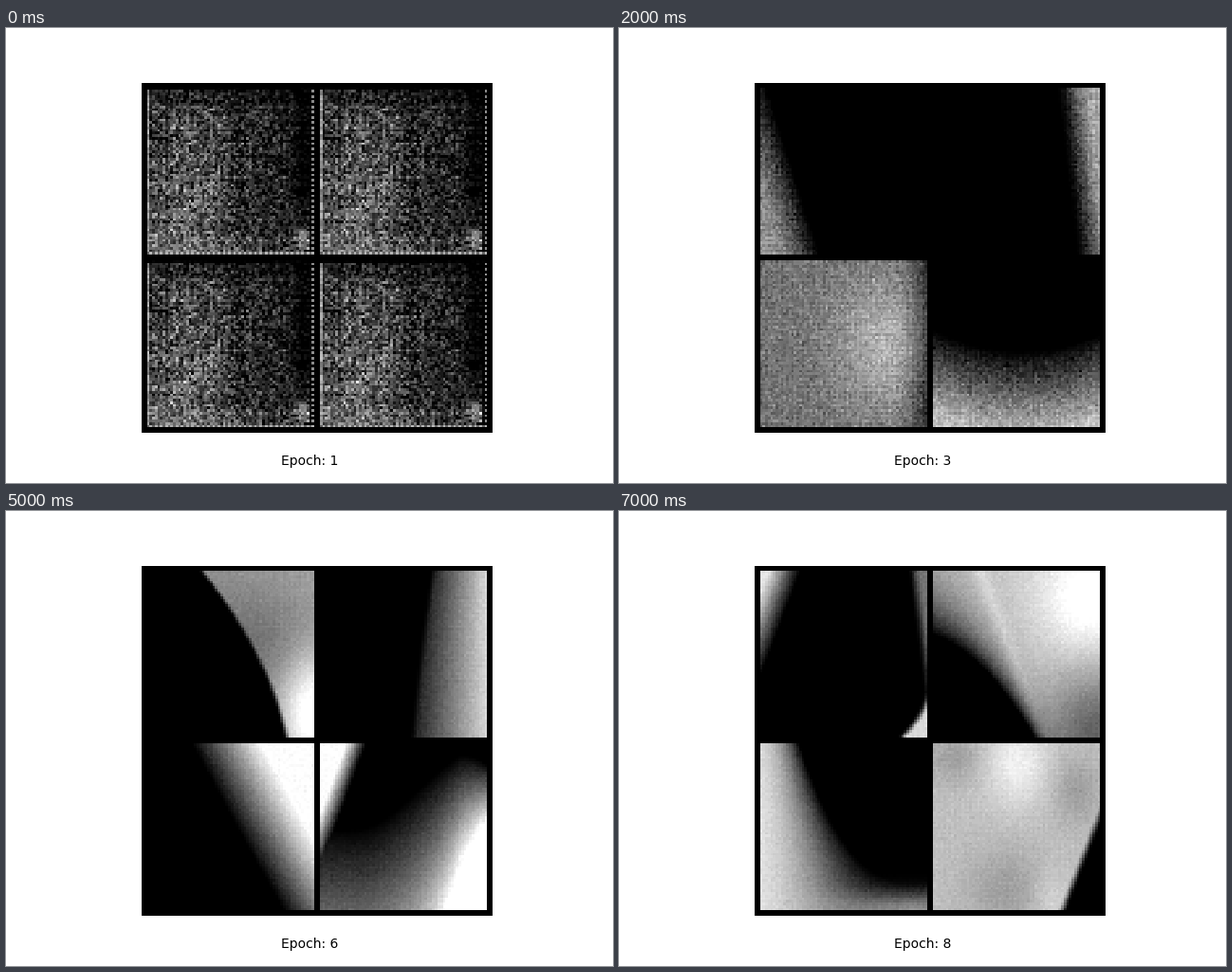
Animation of 640x480 px, one loop 8000 ms. Source, as a matplotlib script:

```python
import numpy as np
import matplotlib.pyplot as plt
from matplotlib.animation import FuncAnimation

N, PAD = 64, 2
V, U = np.mgrid[0:N, 0:N]
X, Y = U / (N - 1), V / (N - 1)


def ramp(d, w):
    return np.clip(d / w, 0, 1)


def soft(d, w):
    t = ramp(d, w)
    return t * t * (3 - 2 * t)


def rise(d, k):
    """Brightness that saturates with the depth d inside an edge."""
    return 1 - np.exp(-k * np.maximum(d, 0))


def bow(t, start, mid, end):
    """Parabola through its values at t = 0, 0.5 and 1."""
    return (start * (1 - t) * (1 - 2 * t) + 4 * mid * t * (1 - t)
            + end * t * (2 * t - 1))


def blob(cx, cy, sx, sy):
    return np.exp(-((X - cx) / sx) ** 2 - ((Y - cy) / sy) ** 2)


def ridge(center, width):
    return np.exp(-((X - center) / width) ** 2)


def grain(tile, rng, amount):
    weave = (U % 2 + V % 2 - 1) * 0.6
    noise = rng.normal(0, 1, tile.shape) + weave
    return tile + amount * noise * ramp(tile, 0.15)


def static(rng):
    mean = 0.13 + 0.23 * blob(0.27, 0.45, 0.27, 0.5)
    mean += 0.16 * blob(0.05, 1, 0.4, 0.35) + 0.08 * soft(Y - 0.85, 0.1)
    mean *= 1 - 0.9 * soft(X - 0.8, 0.15) * (1 - soft(Y - 0.55, 0.4))
    mean *= 0.5 + 0.5 * ramp(Y, 0.15)
    stripes = rng.normal(0, 0.04, (N, 1)) + rng.normal(0, 0.04, (1, N))
    noise = rng.normal(0, 0.16, (N, N)) + stripes
    base = mean + noise * (0.3 + 0.7 * ramp(mean, 0.2))
    base += 0.45 * blob(0.94, 0.91, 0.04, 0.06)
    base[:, 0] = rng.uniform(0.45, 0.75, N)
    base[:, -2] *= 0.2
    base[:, -1] = 0.55 * (np.arange(N) % 2)
    base[-1] = 0.4 + 0.3 * (np.arange(N) % 2)
    base[0] = 0
    return [base + rng.normal(0, 0.015, (N, N)) for _ in range(4)]


def sparks(rng):
    lattice = (V % 4 == 0) & (U % 4 == U // 36)

    def dots(chance, level):
        area = lattice & (U > 18) & (V > 3) & (V < 47)
        lit = area & (rng.random((N, N)) < chance)
        t = lit * level * rng.random((N, N))
        t[59, 8:52:4] = level * rng.uniform(0.2, 1, 11)
        t[12:48:4, 61] = level * rng.uniform(0.2, 1, 9)
        return t

    top, faint = dots(0.4, 0.5), dots(0.06, 0.2)
    glow = blob(0.51, 0.42, 0.12, 0.32) + 0.75 * blob(0.75, 0.47, 0.13, 0.28)
    glow += 0.2 * blob(0.5, 0.45, 0.38, 0.45)
    glow *= 1 - 0.5 * blob(0.635, 0.45, 0.025, 0.35)
    keep = rng.random((N, N)) < 1.5 * glow
    cloud = keep * ramp(glow, 1) ** 0.7 * rng.uniform(0.25, 0.85, (N, N))
    frame = lattice & (U > 7) & (V > 3) & (V < 60)
    cloud = np.maximum(cloud, frame * 0.6 * rng.random((N, N)) ** 2)
    cloud[59, 8:52:2] = rng.uniform(0.2, 0.85, 22)
    return [top, faint, np.maximum(cloud, top), faint * 0.6]


def epoch3():
    return [
        0.55 * ramp(0.03 + 0.32 * Y - X, 0.22),
        0.65 * soft(X - 0.74 - 0.12 * Y, 0.22),
        0.45 + 0.25 * blob(0.75, 0.5, 0.3, 0.4) - 0.4 * soft(X - 0.8, 0.3),
        0.75 * ramp(Y - bow(X, 0.42, 0.55, 0.45), 0.5),
    ]


def epoch4():
    strip = 0.95 * ramp(X - bow(Y, 0.72, 0.77, 0.9), 0.2)
    strip *= 1 - 0.85 * ramp(Y - 0.7, 0.28)
    floor = 0.27 * ramp(Y - 0.73, 0.27) * (1 - 0.7 * ramp(X - 0.66, 0.19))

    folds = 0.66 + 0.08 * blob(0.1, 0.4, 0.2, 0.3)
    folds -= 0.14 * ridge(0.45 - 0.08 * Y, 0.14)
    folds += (0.05 + 0.3 * Y) * ridge(0.58 + 0.28 * Y, 0.14)
    folds -= 0.5 * soft(X - 0.72, 0.3) * (1 - Y) ** 2
    folds *= soft(bow(Y, 1.03, 1, 0.87) - X, 0.07)
    gap = soft(X - 0.62, 0.05) * soft(0.13 + 0.67 * Y - X, 0.07)

    shore = bow(X, 0.26, 0.54, 0.38)
    return [
        (0.62 + 0.15 * Y) * ramp(bow(Y, -0.23, 0.2, 0.34) - X, 0.2),
        np.maximum(strip, floor),
        folds * (1 - gap),
        (1.05 - 0.28 * X) * ramp((Y - shore) / (1 - shore), 0.9),
    ]


def epoch5():
    return [
        0.8 * ramp(X - bow(Y, 0.35, 0.55, 0.7), 0.4),
        0.85 * ramp(X - 0.66 + 0.1 * Y, 0.36),
        0.9 * ramp(X - bow(Y, 0.22, 0.45, 0.72), 0.45),
        0.9 * rise(Y - bow(X, 0.25, 0.5, 0.3), 2.4),
    ]


def epoch6():
    slope = 0.52 + 0.12 * X * (1 - Y) - 0.12 * blob(0.65, 0.4, 0.4, 0.3)
    slope += 0.55 * blob(1, 0.88, 0.2, 0.38)
    slope *= soft(X - bow(Y, 0.31, 0.64, 0.82), 0.04)

    edge = bow(Y, 0.66, 0.59, 0.54)
    column = (0.08 + 0.76 * (X - edge) / (1 - edge)) * soft(X - edge, 0.05)

    hill = 0.52 - 0.5 * soft(X - 0.2, 0.8) + 0.1 * ramp(X - 0.85, 0.15)
    return [
        slope,
        column,
        ramp(X - bow(Y, 0.27, 0.54, 0.82), 0.42),
        np.maximum((0.8 + 2 * X ** 6) * ramp(Y - hill, 1),
                   ramp(0.27 - 0.37 * Y - X, 0.12)),
    ]


def epoch7():
    dome = 0.3 + 0.6 * Y - 0.45 * blob(0.95, 0.08, 0.35, 0.25)
    dome *= soft(X + 0.02 - 0.27 * (1 - Y) ** 3, 0.12)
    wedge = soft(X - 1.12 + 0.45 * Y, 0.05)

    d = X - 0.3 - 0.39 * Y
    west = 1 + 2.4 * d - 0.5 * blob(0, 0, 0.1, 0.15)
    east = 0.85 - 0.28 * X * (1 - Y) + 0.05 * Y
    sides = np.clip(np.where(d < 0, west, east), 0, 1)
    crest = soft(0.11 - abs(d), 0.1)

    t = X - 0.37
    mound = rise(Y - 0.32 - 0.57 * (t + np.hypot(t, 0.07)), 4 - 4 * X)
    corner = 0.25 * soft(X - 0.91 - 0.4 * Y, 0.06)
    return [
        dome + (0.99 - dome) * wedge,
        sides + (1 - sides) * crest,
        np.maximum(mound, corner),
        rise(Y - 0.56 + 1.9 * (X - 0.6) ** 2, 2.1),
    ]


def epoch8():
    left = 0.9 * ramp(0.235 - 0.38 * Y - X, 0.19)
    right = 0.45 * soft(X - 0.89 - 0.13 * Y, 0.08)
    wedge = 0.85 * soft(X - 1 + 1.45 * np.maximum(Y - 0.66, 0) ** 2, 0.06)

    sky = 0.78 + 0.3 * blob(0.95, 0.15, 0.3, 0.35)
    sky += 0.1 * ridge(0.28 + 0.38 * Y, 0.05) - 0.4 * blob(1, 1, 0.35, 0.4)
    sky *= rise(0.38 + 0.35 * X + 1.1 * X ** 2 - Y, 4 + 6 * X)

    t = (X - 0.23) / 0.77
    bowl = 0.95 * rise(Y - 0.85 * (1 - (1 - t) ** 2.8), 2.4 - 1.1 * Y)
    bowl += 0.4 * blob(1, 1, 0.5, 0.1)

    slab = 0.75 + 0.2 * blob(0.5, 0.12, 0.2, 0.25)
    slab -= 0.13 * (blob(0.13, 0.08, 0.18, 0.15) + blob(0.86, 0.28, 0.15, 0.2)
                    + blob(0.45, 0.88, 0.25, 0.25))
    slab += 0.1 * blob(0.7, 0.95, 0.12, 0.2)
    return [
        np.maximum(left, np.maximum(right, wedge)),
        sky,
        bowl,
        slab * soft(1.2 - 0.39 * Y - X, 0.06),
    ]


def mosaic(tiles):
    size = 2 * (N + PAD) + PAD
    sheet = np.zeros((size, size))
    for i, tile in enumerate(tiles):
        y = PAD + (i // 2) * (N + PAD)
        x = PAD + (i % 2) * (N + PAD)
        sheet[y:y + N, x:x + N] = np.clip(tile, 0, 1)
    return sheet


def build():
    rng = np.random.default_rng(7)
    sheets = [mosaic(static(rng)), mosaic(sparks(rng))]
    for make in (epoch3, epoch4, epoch5, epoch6, epoch7, epoch8):
        amount = 0.06 if make is epoch3 else 0.017
        sheets.append(mosaic([grain(t, rng, amount) for t in make()]))
    return sheets


sheets = build()
fig, ax = plt.subplots(figsize=(6.4, 4.8), dpi=100)
ax.axis("off")
image = ax.imshow(sheets[0], cmap="gray", vmin=0, vmax=1,
                  interpolation="nearest")
label = fig.text(0.5, 0.04, "Epoch: 1", ha="center", fontsize=10,
                 family="DejaVu Sans")


def update(i):
    image.set_data(sheets[i])
    label.set_text(f"Epoch: {i + 1}")
    return image, label


anim = FuncAnimation(fig, update, frames=len(sheets), interval=1000,
                     repeat=True, repeat_delay=0)
plt.show()
```
